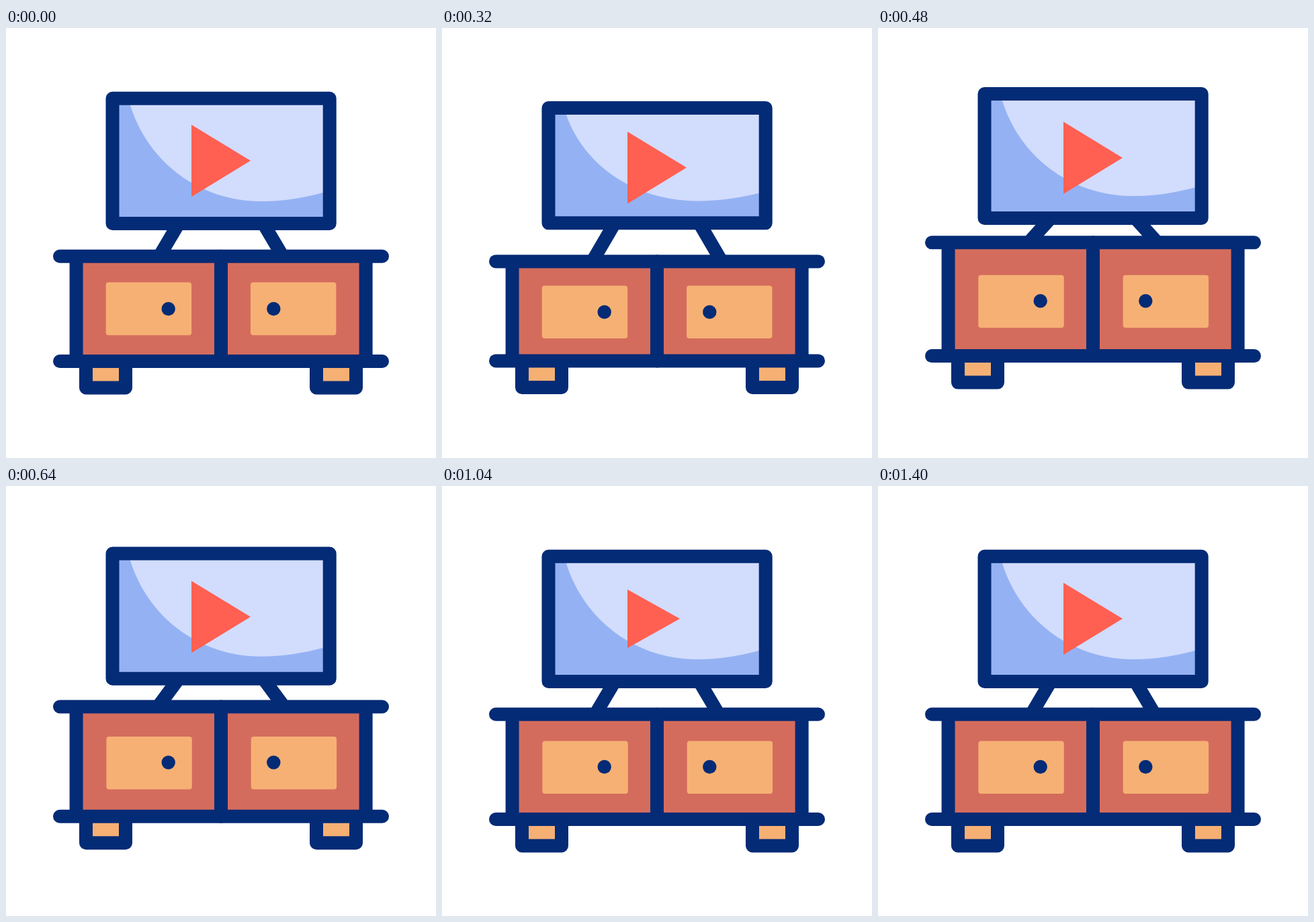
An HTML page without scripts for the animation above (1.48 s loop, 640 by 640 pixels).

```html
<!DOCTYPE html>
<html lang="en">
<head>
<meta charset="utf-8">
<title>TV stand</title>
<style>
  @property --f { syntax: "<number>"; inherits: true; initial-value: 0; }

  html, body { margin: 0; width: 100%; height: 100%; overflow: hidden; background: #fff; }

  svg {
    display: block; width: 100%; height: 100%;
    /* --f ticks every 40 ms */
    animation: tick 1480ms steps(37, end) -1ms infinite;

    /* sine-eased phases: crouch, leap, settle */
    --p1: calc((1 - cos(clamp(0, (var(--f) - 2) / 5, 1) * 180deg)) / 2);
    --p2: calc((1 - cos(clamp(0, (var(--f) - 7) / 6, 1) * 180deg)) / 2);
    --p3: calc((1 - cos(clamp(0, (var(--f) - 13) / 6, 1) * 180deg)) / 2);
    --pulse: calc((1 - cos(clamp(0, (var(--f) - 23) / 12, 1) * 360deg)) / 2);
    --low: calc(var(--p1) - var(--p2));
    --high: calc(var(--p2) - var(--p3));

    /* vertical offsets of the moving levels */
    --top: calc(16 * var(--low) - 8.2 * var(--high));
    --play: calc(11.4 * var(--low) - 5.5 * var(--high));
    --bar: calc(9.9 * var(--low) - 22.5 * var(--high));
    --door: calc(6.1 * var(--low) - 13 * var(--high));
    --base: calc(-8.5 * var(--high));
    --spread: calc(29 + 4.5 * var(--low) + 4 * var(--high));
  }
  @keyframes tick { from { --f: 0; } to { --f: 37; } }

  .ink { fill: none; stroke: #042b76; stroke-width: 20; stroke-linecap: round; stroke-linejoin: round; }
  .navy { fill: #042b76; }
  .wood { fill: #d46c5d; }
  .tan { fill: #f6b074; }

  .tv {
    y: calc((104.7 + var(--top)) * 1px);
    height: calc((186.2 + var(--base) - var(--top)) * 1px);
  }
  .shine {
    fill: #d2dcfd;
    transform: translateY(calc((258 + var(--base)) * 1px))
      scaleY(calc((143.3 + var(--base) - var(--top)) / 143.3));
  }
  .play {
    fill: #ff6052;
    transform: translate(276px, calc((197.6 + var(--play)) * 1px))
      scale(calc(1 - .227 * var(--pulse)), calc(1 - .374 * var(--pulse)));
  }
  .leg {
    vector-effect: non-scaling-stroke;
    transform: translate(calc(var(--x) * 1px), calc((291 + var(--base)) * 1px))
      scale(calc(var(--dir) * var(--spread)), calc(49 + var(--bar) - var(--base)));
  }
  .left { --x: 257; --dir: -1; }
  .right { --x: 383; --dir: 1; }

  .body {
    y: calc((339.7 + var(--bar)) * 1px);
    height: calc((156.3 + var(--base) - var(--bar)) * 1px);
  }
  .post {
    y: calc((329.7 + var(--bar)) * 1px);
    height: calc((176.4 + var(--base) - var(--bar)) * 1px);
  }
  .bar { transform: translateY(calc(var(--bar) * 1px)); }
  .base { transform: translateY(calc(var(--base) * 1px)); }
  .knobs { transform: translateY(calc(var(--door) * 1px)); }
  .doors {
    transform: translate(calc(.7px * var(--p2)), calc((var(--door) + .8 * var(--p2)) * 1px));
  }
</style>
</head>
<body>
<svg viewBox="0 0 640 640">
  <path class="ink leg left" d="M0 0L1 1"/>
  <path class="ink leg right" d="M0 0L1 1"/>

  <rect class="tv" x="158.5" width="323.2" fill="#94b2f3"/>
  <path class="shine" d="M182-154L185-143C211-59 287 0 380 0C412 0 443-5 472-13L477-15V-154Z"/>
  <path class="play" d="M0-53.7L88 0L0 53.7Z"/>
  <rect class="ink tv" x="158.5" width="323.2"/>

  <g class="base">
    <path class="ink" style="fill:#f6b074" d="M119 496V535.5H178V496"/>
    <path class="ink" style="fill:#f6b074" d="M462 496V535.5H521V496"/>
  </g>

  <rect class="wood body" x="104.5" width="431"/>
  <g class="tan doors">
    <rect x="148.7" y="378.6" width="127.4" height="78.6" rx="4"/>
    <rect x="364" y="378.6" width="127.4" height="78.6" rx="4"/>
  </g>
  <g class="navy knobs">
    <circle cx="241.7" cy="418" r="10.2"/>
    <circle cx="398.3" cy="418" r="10.2"/>
  </g>
  <g class="navy">
    <rect class="body" x="94.6" width="20"/>
    <rect class="post" x="310" width="20" rx="10"/>
    <rect class="body" x="525.6" width="20"/>
  </g>
  <path class="ink bar" d="M80 339.7H560"/>
  <path class="ink base" d="M80 496H560"/>
</svg>
</body>
</html>
```
